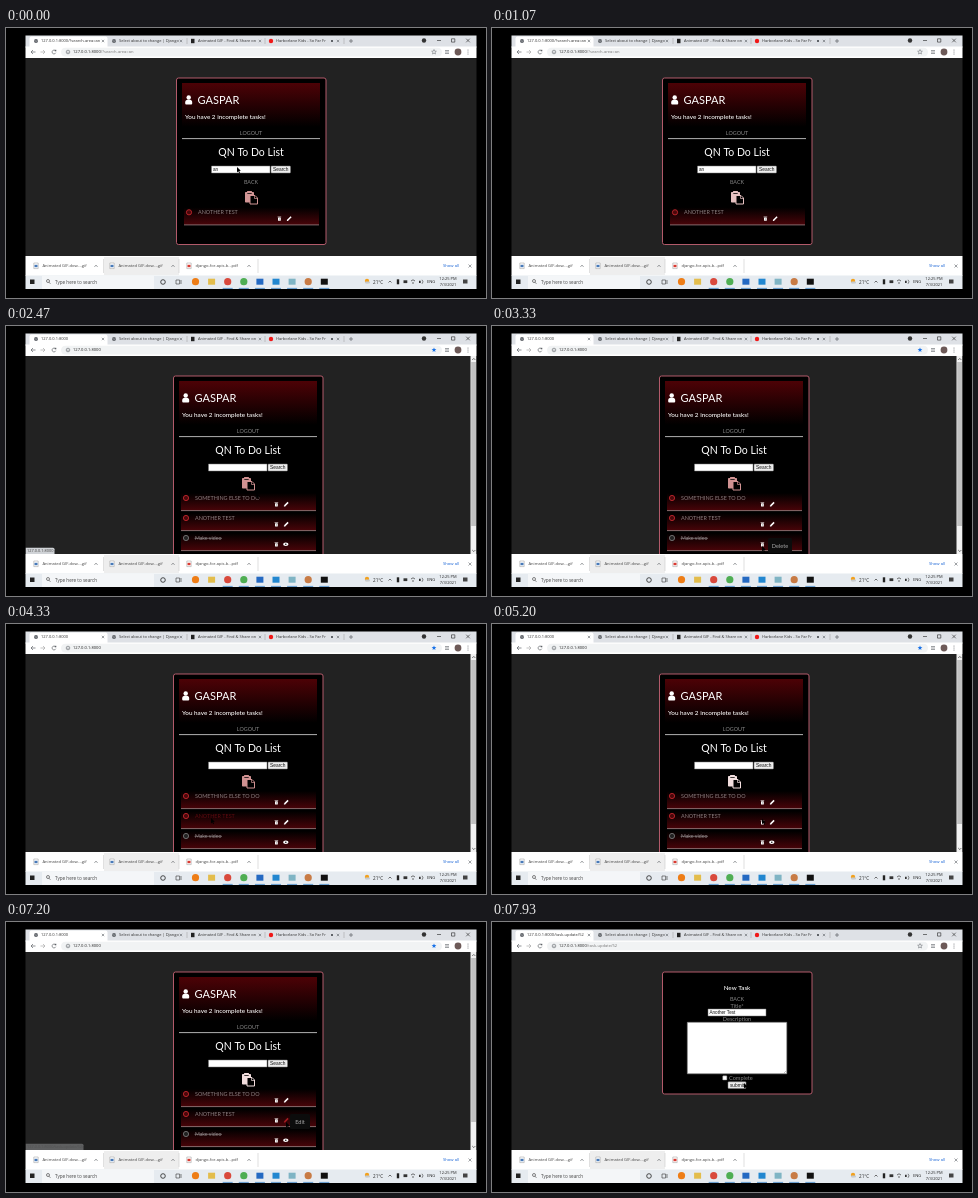
An HTML page with a canvas for the animation above (8 s loop, 480 px wide and 270 px high).

```html
<!DOCTYPE html>
<html lang="en">
<head>
<meta charset="utf-8">
<title>To do list walkthrough</title>
<style>
html, body { margin: 0; width: 100%; height: 100%; overflow: hidden; background: #000; }
canvas { display: block; width: 480px; height: 270px; }
</style>
</head>
<body>
<canvas></canvas>
<script>
const LOOP = 8000;
const LIST_LOADS = 2130, FORM_LOADS = 7530;
const canvas = document.querySelector('canvas');
const c = canvas.getContext('2d');
const dpr = window.devicePixelRatio || 1;
canvas.width = 480 * dpr;
canvas.height = 270 * dpr;

const UI = '"Open Sans", sans-serif', PAGE = 'Lato, sans-serif', FIELD = '"Liberation Sans", Arial, sans-serif';
const HOVER = '#5e0b10', GREY = '#5f6368', MUTED = '#858585', BORDER = '#b25a6a';

// [time, x, y] stops of the pointer
const path = [
  [0, 231, 139], [700, 231, 139], [1500, 246, 156], [2300, 246, 156], [2950, 270, 220],
  [3500, 270, 220], [3700, 280, 220], [3950, 280, 220], [4250, 205, 194], [4600, 205, 194],
  [4850, 270, 200], [5100, 270, 200], [5400, 270, 180], [5750, 270, 180], [5960, 243, 159],
  [6250, 243, 159], [6550, 280, 180], [6750, 280, 180], [6950, 280, 200], [7400, 280, 200],
  [7880, 252, 161], [LOOP, 252, 161]
];
// [from, to, label, left, top, width]
const tips = [
  [3100, 3560, 'Delete', 276, 212, 24], [3760, 4000, 'View', 284, 212, 19],
  [4900, 5150, 'Delete', 276, 192, 24], [5450, 6070, 'Delete', 276, 172, 24],
  [6600, 6800, 'Edit', 284, 172, 20], [7030, FORM_LOADS, 'Edit', 284, 192, 20]
];

const clamp = v => Math.max(0, Math.min(1, v));

function rect(x, y, w, h, fill, stroke, radius = 0, lineWidth = .7) {
  c.beginPath();
  c.roundRect(x, y, w, h, radius);
  if (fill) { c.fillStyle = fill; c.fill(); }
  if (stroke) { c.strokeStyle = stroke; c.lineWidth = lineWidth; c.stroke(); }
}
function dot(x, y, r, fill, stroke, lineWidth = .7) {
  rect(x - r, y - r, 2 * r, 2 * r, fill, stroke, r, lineWidth);
}
function line(color, width, ...points) {
  c.beginPath();
  for (let i = 0; i < points.length; i += 2) c.lineTo(points[i], points[i + 1]);
  c.strokeStyle = color;
  c.lineWidth = width;
  c.stroke();
}
function text(str, x, y, size, color, family = UI, align = 'left', weight = 400) {
  c.font = `${weight} ${size}px ${family}`;
  c.textAlign = align;
  c.textBaseline = 'alphabetic';
  c.fillStyle = color;
  c.fillText(str, x, y + size * .36);
}
function cross(x, y, r, color = GREY) {
  line(color, .6, x - r, y - r, x + r, y + r);
  line(color, .6, x - r, y + r, x + r, y - r);
}
function gradient(y0, y1, top, bottom) {
  const g = c.createLinearGradient(0, y0, 0, y1);
  g.addColorStop(0, top);
  g.addColorStop(1, bottom);
  return g;
}
function globe(x, y) {
  dot(x, y, 2, GREY);
  line('#dee1e6', .4, x - 1.5, y - .5, x + .5, y + .4, x + 1.4, y - .8);
}

function pointerAt(t) {
  const i = path.findIndex(p => p[0] > t);
  const [t0, x0, y0] = path[i - 1], [t1, x1, y1] = path[i];
  const u = (t - t0) / (t1 - t0), e = u * u * (3 - 2 * u);
  return [x0 + (x1 - x0) * e, y0 + (y1 - y0) * e];
}

function drawChrome(t) {
  const loading = (t >= 1730 && t < LIST_LOADS) || (t >= 7400 && t < FORM_LOADS);
  const route = t < 1730 ? '/?search-area=an' : t < 7400 ? '' : '/task-update/52';
  const host = '127.0.0.1:8000', bookmarked = route === '';

  rect(19.5, 7.5, 451, 12, '#dee1e6');
  rect(23.5, 8.5, 78, 11, '#fff', null, [2, 2, 0, 0]);
  rect(19.5, 18.5, 451, 11.5, '#fff');

  if (!loading) globe(30, 13);
  text(host + route, 35, 13, 4, '#333');
  globe(108, 13);
  text('Select about to change | Django', 113, 13, 4, '#333');
  rect(185, 10.8, 3.5, 4.4, '#222');
  text('Animated GIF - Find & Share on', 192, 13, 4, '#333');
  dot(265, 13, 2.2, '#f01818');
  text('Harborlane Kids - So Far Fr', 270, 13, 4, '#333');
  rect(325, 12, 2, 2, GREY);
  for (const x of [97, 175, 254, 332]) cross(x, 13, 1.2);
  for (const x of [181, 259, 338]) line('#999', .5, x, 10, x, 16);
  line(GREY, .7, 343, 13, 347, 13);
  line(GREY, .7, 345, 11, 345, 15);
  dot(418, 12.5, 2.2, '#333');
  line('#222', .6, 431, 12.5, 435, 12.5);
  rect(445.5, 10.8, 3.3, 3.3, null, '#222', 0, .6);
  cross(462, 12.5, 1.8, '#222');

  line(GREY, .7, 27, 22, 25, 24, 27, 26);
  line(GREY, .7, 25, 24, 29.5, 24);
  line('#aaa', .7, 37, 22, 39, 24, 37, 26);
  line('#aaa', .7, 34.5, 24, 39, 24);
  if (loading) cross(48, 24, 1.7);
  else {
    c.beginPath();
    c.arc(48, 24, 1.9, .4, 5.6);
    c.strokeStyle = GREY;
    c.stroke();
    rect(48.8, 21.8, 1.5, 1.5, GREY);
  }
  rect(55, 19.8, 381, 8.6, '#f1f3f4', null, 4.3);
  dot(62, 24, 1.8, null, GREY, .6);
  line(GREY, .6, 62, 23.6, 62, 25);
  text(host, 67, 24, 4.1, '#222');
  const hostWidth = c.measureText(host).width;
  text(route, 67 + hostWidth, 24, 4.1, '#777');

  c.beginPath();
  for (let i = 0; i < 10; i++) {
    const r = i % 2 ? 1.1 : 2.5, a = i * Math.PI / 5 - Math.PI / 2;
    c.lineTo(428 + r * Math.cos(a), 24 + r * Math.sin(a));
  }
  c.closePath();
  c.strokeStyle = c.fillStyle = bookmarked ? '#1a73e8' : GREY;
  c.lineWidth = .5;
  bookmarked ? c.fill() : c.stroke();
  for (const y of [22.5, 24, 25.5]) line(GREY, .6, 439, y, 443, y);
  dot(452, 24, 3.4, '#6d5a58');
  for (const y of [22, 24, 26]) dot(462, y, .5, GREY);
}

function drawDownloads() {
  rect(19.5, 228, 451, 20, '#fff');
  rect(98, 229, 75, 18, '#eeeeee');
  for (const x of [97.5, 173, 252]) line('#ccc', .6, x, 231, x, 245);
  const files = [[30, 'Animated GIF-dow....gif', '#4779b8', 90],
    [106, 'Animated GIF-dow....gif', '#4779b8', 167], [183, 'django-for-apis-b...pdf', '#d93a32', 243]];
  for (const [x, name, color, arrow] of files) {
    rect(x - 2.2, 235, 4.4, 5.6, '#fff', '#999', 0, .5);
    rect(x - 1.5, 236.8, 3, 2.4, color);
    text(name, x + 6.5, 238, 4.1, '#444');
    line(GREY, .7, arrow - 1.5, 238.8, arrow, 237.2, arrow + 1.5, 238.8);
  }
  text('Show all', 437, 237.8, 4.2, '#1a65d6');
  cross(464, 238, 1.5);
}

function drawTaskbar() {
  rect(19.5, 247.5, 451, 13.5, '#e6ebf0');
  rect(24, 251.5, 4.5, 4.5, '#222');
  rect(36, 248, 112, 13, '#f4f6f8');
  dot(42, 253, 1.5, null, '#333', .6);
  line('#333', .6, 43, 254.2, 44.4, 255.8);
  text('Type here to search', 49, 254, 4.6, '#444');
  dot(157, 254, 2.3, null, '#222', .8);
  rect(170, 252, 3.6, 4, null, '#333', 0, .6);
  line('#333', .6, 175, 252, 175, 256);

  const apps = ['#ee7d16', '#e3bd4c', '#d9493c', '#4fae53', '#2469c2', '#2287d0', '#7fb4c4', '#c87b45', '#111'];
  apps.forEach((color, i) => {
    const x = 189.5 + i * 16.1;
    if ([0, 2, 3, 7].includes(i)) dot(x, 253.7, 3.6, color);
    else rect(x - 3.5, 250.7, 7, 6, color);
    if (i > 1) line('#3b82c4', .8, x - 5, 260.4, x + 5, 260.4);
  });

  dot(361, 253, 2.2, '#f2a11e');
  rect(359, 253.6, 5, 1.8, '#c6cbd0', null, 1);
  text('21°C', 367, 254, 4.6, '#222');
  line('#333', .7, 382.5, 254.5, 384, 253, 385.5, 254.5);
  rect(390.8, 251.3, 2.4, 5, '#222');
  rect(397.5, 252.3, 3.8, 2.8, '#333');
  line('#333', .7, 405, 253, 407, 251.8, 409, 253);
  dot(407, 255, .7, '#333');
  rect(413, 252.7, 1.7, 2.2, '#333');
  line('#333', .6, 416, 251.8, 417, 253.8, 416, 255.8);
  text('ENG', 421, 254, 4.1, '#222');
  text('12:25 PM', 442, 250.9, 4, '#222', UI, 'center');
  text('7/3/2021', 442, 257, 4, '#222', UI, 'center');
  rect(457, 251.5, 4.5, 4, '#444');
}

function trash(x, y) {
  rect(x - 1.4, y - 1, 2.8, 3.2, '#fff', null, .5);
  line('#fff', .6, x - 1.8, y - 1.7, x + 1.8, y - 1.7);
  line('#555', .4, x, y - .4, x, y + 1.5);
}
function pencil(x, y, color) {
  line(color, 1.5, x - 1.6, y + 1.6, x + 1.9, y - 1.9);
  rect(x - 2.3, y + 1.1, 1.2, 1.2, color);
}
function eye(x, y) {
  c.beginPath();
  c.ellipse(x, y, 2.7, 1.7, 0, 0, 7);
  c.fillStyle = '#fff';
  c.fill();
  dot(x, y, .8, '#111');
}
function pasteIcon(x, y, color) {
  rect(x - 6, y - 5.5, 9, 10.5, color, null, .8);
  rect(x - 4, y - 6.5, 5, 2, color, null, .6);
  rect(x - 3.7, y - 4.5, 4.4, .8, '#000');
  c.beginPath();
  for (const [px, py] of [[-1, -2], [4, -2], [6.5, .5], [6.5, 6.5], [-1, 6.5]]) c.lineTo(x + px, y + py);
  c.closePath();
  c.fillStyle = '#000';
  c.fill();
  c.strokeStyle = color;
  c.lineWidth = 1;
  c.stroke();
  line(color, .7, x + 3.5, y - 2, x + 3.5, y + 1, x + 6.5, y + 1);
}

function taskRow(name, x, y, state = {}) {
  const ring = state.done ? '#777' : '#c2282e';
  rect(x + 2, y - 5, 135, 17.5, gradient(y - 5, y + 13, '#000', '#4a0409'));
  line('#b5979a', .7, x + 2, y + 12.6, x + 137, y + 12.6);
  dot(x + 7, y, 2.6, state.done ? '#222' : '#4a080b', ring, .9);
  text(name, x + 16, y + .2, state.done ? 5.2 : 5.45, state.hover ? HOVER : '#8d8082', PAGE);
  if (state.done) line('#aaa', .5, x + 15.5, y + .3, x + 43, y + .3);
  trash(x + 97.4, y + 6.3);
  if (state.done) eye(x + 106.8, y + 6.3);
  else pencil(x + 107.2, y + 6.3, state.editing ? '#a31c22' : '#fff');
}

function drawList(t) {
  const full = t >= LIST_LOADS;
  const x = full ? 173 : 176, mid = x + 69;
  const between = (a, b) => t >= a && t < b;

  rect(x - 5.5, 50, 149.5, full ? 190 : 166.5, '#000', BORDER, 2, 1);
  rect(x, 55, 138, 44, gradient(55, 99, '#4d0206', '#000'));
  dot(x + 6.7, 69.5, 2.2, '#fff');
  rect(x + 3.2, 71.8, 7, 4.6, '#fff', null, [2.6, 2.6, 1, 1]);
  text('GASPAR', x + 15.5, 72, 11, '#fff', PAGE);
  text('You have 2 incomplete tasks!', x + 3, 88.7, 6.35, '#fff', PAGE, 'left', 500);
  text('LOGOUT', mid, 104.8, 5.4, MUTED, PAGE, 'center');
  line('#ddd', .8, x, 110.6, x + 138, 110.6);
  text('QN To Do List', mid, 124.5, 10.5, '#fff', PAGE, 'center');
  rect(x + 29.5, 138, 58.5, 7, '#fff', '#777', 0, .5);
  if (!full) text('an', x + 31, 141.6, 4.6, '#111', FIELD);
  rect(x + 89, 138, 19.5, 7, '#eee', '#777', .7, .5);
  text('Search', x + 98.7, 141.6, 4.8, '#111', FIELD, 'center');
  if (!full) text('BACK', mid, 154, 5.4, t >= 1350 ? HOVER : MUTED, PAGE, 'center');

  const glow = Math.pow(Math.max(0, Math.cos((t / 1000 - .15) * 2 * Math.PI)), 6);
  const tint = Math.round(145 + 105 * glow);
  const paste = between(5900, 6350) ? HOVER : `rgb(${Math.round(208 + 47 * glow)},${tint},${tint})`;
  pasteIcon(mid, full ? 157.5 : 169.5, paste);

  if (full) {
    taskRow('SOMETHING ELSE TO DO', x, 172, { editing: between(6480, 6800) });
    taskRow('ANOTHER TEST', x, 192, { hover: between(4120, 4690), editing: t >= 6900 });
    taskRow('Make video', x, 212, { done: true });
    rect(464.5, 30, 6, 198, '#f1f1f1');
    rect(465.2, 36, 4.8, 164, '#c1c1c1');
    line('#555', .8, 466.2, 34, 467.8, 32.4, 469.4, 34);
    line('#555', .8, 466.2, 224, 467.8, 225.6, 469.4, 224);
  } else taskRow('ANOTHER TEST', x, 184.3);
}

function drawForm() {
  rect(170.5, 50, 149.5, 122, '#000', BORDER, 2, 1);
  text('New Task', 245, 65.5, 6.3, '#fff', PAGE, 'center', 500);
  text('BACK', 245, 77.5, 5.4, MUTED, PAGE, 'center');
  text('Title*', 245, 83.7, 5.6, MUTED, PAGE, 'center');
  rect(216, 87, 58, 7, '#fff', '#777', 0, .5);
  text('Another Test', 217.5, 90.6, 4.6, '#111', FIELD);
  text('Description', 245, 97.2, 5.6, MUTED, PAGE, 'center');
  rect(195.3, 100.3, 99.5, 51.5, '#fff', '#777', 0, .6);
  line('#888', .5, 292, 151, 294, 149);
  rect(230.7, 153.8, 4.2, 4.2, '#fff', '#777', .6, .5);
  text('Complete', 237, 156, 5.6, MUTED, PAGE);
  rect(236, 159.8, 18, 6.6, '#eee', '#777', .7, .5);
  text('submit', 245, 163, 4.8, '#111', FIELD, 'center');
}

function drawStatus(t) {
  const first = t < 4000;
  const alpha = first ? clamp((t - 1600) / 100) * clamp((2660 - t) / 100)
    : clamp((t - 7070) / 380) * clamp((7850 - t) / 80);
  if (!alpha) return;
  c.globalAlpha = alpha;
  rect(19.5, 221.7, first ? 29 : 58, 6.3, '#d0d3d7', null, [0, 1.5, 0, 0]);
  text('127.0.0.1:8000' + (first ? '' : '/task-update/52/'), 21, 225, 3.9, '#444');
  c.globalAlpha = 1;
}

function drawPointer(t) {
  const [x, y] = pointerAt(t);
  c.beginPath();
  for (const [dx, dy] of [[0, 0], [0, 5.4], [1.3, 4.3], [2.2, 6.2], [3, 5.8], [2.2, 3.9], [3.8, 3.8]])
    c.lineTo(x + dx, y + dy);
  c.closePath();
  c.fillStyle = '#000';
  c.fill();
}

function draw() {
  const t = performance.now() % LOOP;
  c.setTransform(dpr, 0, 0, dpr, 0, 0);
  rect(0, 0, 480, 270, '#000');
  rect(19.5, 30, 451, 198, '#222');
  c.save();
  c.beginPath();
  c.rect(19.5, 30, 451, 198);
  c.clip();
  t < FORM_LOADS ? drawList(t) : drawForm();
  for (const [from, to, label, x, y, w] of tips) {
    if (t < from || t >= to) continue;
    rect(x, y, w, 15, '#0c0c0c', null, 1.5);
    text(label, x + w / 2, y + 7.6, 5.6, '#a8a8a8', PAGE, 'center');
  }
  drawStatus(t);
  c.restore();
  drawChrome(t);
  drawDownloads();
  drawTaskbar();
  drawPointer(t);
  requestAnimationFrame(draw);
}
draw();
</script>
</body>
</html>
```
